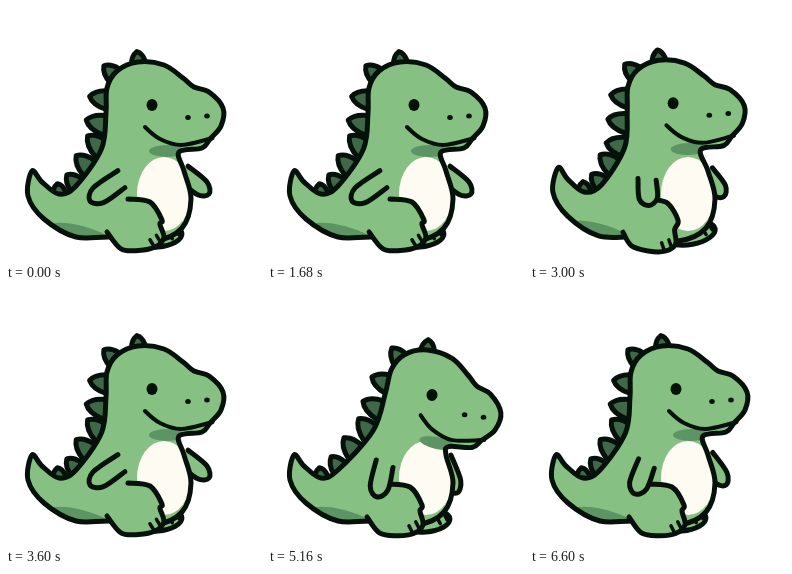
These frames come from a looping animation (256x256 px, 6.72 s). An HTML page with a canvas:

```html
<!DOCTYPE html>
<html lang="en">
<head>
<meta charset="utf-8">
<title>Walking dinosaur</title>
<style>
html, body { margin: 0; height: 100%; overflow: hidden; background: #fff; }
canvas { display: block; width: 100vw; height: 100vh; }
</style>
</head>
<body>
<canvas id="stage"></canvas>
<script>
const STEP = 120, STEPS = 56, CYCLE = 14, JUMP_START = 42, SPIKES = 8;
const INK = '#07110c', GREEN = '#86c183', SHADE = '#5d9464', SPIKE = '#3f6849',
      CREAM = '#fefbf3', RED = '#c65c58';

const canvas = document.getElementById('stage');
const ctx = canvas.getContext('2d');

// Rigid parts, each in its own coordinates: head around the eye, tail around its root.
const SKULL = [[-46, 8], [-45, -17], [-35, -34], [-14, -43], [12, -40], [31, -27],
               [42, -18], [57, -13], [71, 3], [69, 21], [58, 34]];
const JAW = [[50, 43], [27, 47]];
const LIP = [[-7, 22], [8, 34], [29, 40], [57, 34]];
const TAIL_TOP = [[-64, -40], [-54, -29], [-37, -17], [-20, -25]];
const TAIL_UNDER = [[-20, 26], [-52, 8], [-68, -15]];
const TORSO = [[178, 165], [185, 193], [176, 222], [148, 235], [105, 231]];
const THIGH = [[-8, -25], [14, -22], [26, -4]];
const FOOT = [[14, -14], [16, 0], [6, 8], [-11, 9], [-28, 5]];

// hip: shift and tail angle; head, foot, farFoot: place and angle.
const stride = {
  hip: [0, 0, 0], head: [146, 99, 0], jaw: [0],
  hand: [84, 195], farHand: [203, 188],
  knee: [130, 218], foot: [142, 234, -8], farFoot: [151, 230, -5]
};
const sway = {
  hip: [0, 0, 12], head: [135, 92, -2.5], jaw: [0],
  hand: [158, 187], farHand: [188, 178],
  knee: [105, 216], foot: [103, 239, 27], farFoot: [188, 220, -28]
};
const gather = {
  ...stride, hand: [105, 204], farHand: [196, 195], knee: [128, 219], foot: [139, 236, -4]
};
const lean = {
  ...gather, head: [164, 105, 12], hand: [109, 207], farHand: [189, 203], farFoot: [157, 231, -5]
};
const leap = {
  hip: [1, -38, -29], head: [131, 54, -20], jaw: [1],
  hand: [97, 153], farHand: [194, 140],
  knee: [118, 180], foot: [122, 207, 30], farFoot: [161, 192, 0]
};

const lerp = (a, b, t) => a.map((v, i) => v + (b[i] - v) * t);
const mix = (from, to, t) => Object.fromEntries(
  Object.keys(from).map(part => [part, lerp(from[part], to[part], t)]));

const walkKeys = [[0, stride], [2, stride], [7, sway], [13, gather], [14, stride]];
const jumpKeys = [
  [42, stride], [43, lean], [45, mix(gather, lean, 2.6)], [48, leap],
  [50, mix(stride, leap, 1.12)], [53, mix(gather, lean, 1.9)],
  [54, lean], [55, gather], [56, stride]
];

function poseAt(step) {
  const walking = step < JUMP_START;
  const keys = walking ? walkKeys : jumpKeys;
  const at = walking ? step % CYCLE : step;
  const next = keys.findIndex(([time]) => time > at);
  const [t0, from] = keys[next - 1], [t1, to] = keys[next];
  const u = (at - t0) / (t1 - t0);
  return mix(from, to, u * u * (3 - 2 * u));
}

// Moves local points to a place and turns them by an angle in degrees.
function put(points, [x, y, angle = 0]) {
  const c = Math.cos(angle * Math.PI / 180), s = Math.sin(angle * Math.PI / 180);
  return points.map(([px, py]) => [x + px * c - py * s, y + px * s + py * c]);
}

// Smooth curve through all knots.
function curve(knots, closed = true) {
  const n = knots.length, path = new Path2D();
  const knot = i => knots[closed ? (i + n) % n : Math.max(0, Math.min(n - 1, i))];
  const handle = (i, side) => knot(i).map((v, axis) =>
    v + side / 6 * (knot(i + 1)[axis] - knot(i - 1)[axis]));
  path.moveTo(...knots[0]);
  for (let i = 0; i < (closed ? n : n - 1); i++) {
    path.bezierCurveTo(...handle(i, 1), ...handle(i + 1, -1), ...knot(i + 1));
  }
  if (closed) path.closePath();
  return path;
}

function oval([x, y, angle = 0], rx, ry) {
  const path = new Path2D();
  path.ellipse(x, y, rx, ry, angle * Math.PI / 180, 0, Math.PI * 2);
  return path;
}

function fill(path, color) {
  ctx.fillStyle = color;
  ctx.fill(path);
}

function outlined(path, color) {
  fill(path, color);
  ctx.stroke(path);
}

// Spikes stand along the back, closer together towards the tail.
function drawSpikes(back) {
  const lengths = back.slice(1).map(([x, y], i) => Math.hypot(x - back[i][0], y - back[i][1]));
  const total = lengths.reduce((sum, length) => sum + length);
  for (let i = 0; i < SPIKES; i++) {
    const u = i / (SPIKES - 1), bulge = Math.sin(Math.PI * u);
    let rest = total * u * (0.8 + 0.2 * u), k = 0;
    while (k < lengths.length - 1 && rest > lengths[k]) rest -= lengths[k++];
    const [x, y] = lerp(back[k], back[k + 1], rest / lengths[k]);
    const dx = (back[k + 1][0] - back[k][0]) / lengths[k];
    const dy = (back[k + 1][1] - back[k][1]) / lengths[k];
    const at = (along, out) => [x + dx * along + dy * out, y + dy * along - dx * out];
    const half = 7 + 3 * bulge, height = 10 + 9 * bulge;
    const path = new Path2D();
    path.moveTo(...at(-half, 0));
    path.quadraticCurveTo(...at(-half * 0.6, height * 0.8), ...at(3, height));
    path.quadraticCurveTo(...at(half, height * 0.7), ...at(half, 0));
    outlined(path, SPIKE);
  }
}

function arm(shoulder, hand, width) {
  const dx = hand[0] - shoulder[0], dy = hand[1] - shoulder[1];
  const length = Math.hypot(dx, dy);
  const at = (along, side) => [shoulder[0] + dx * along - dy / length * side,
                               shoulder[1] + dy * along + dx / length * side];
  return curve([at(0, width), at(0.75, width), at(1, 0), at(0.75, -width), at(0.1, -width)], false);
}

function drawToes(place, x, y) {
  for (const shift of [0, 7]) {
    const toe = [[x + shift, y - shift / 2], [x + shift + 3, y - shift / 2 + 7]];
    ctx.stroke(curve(put(toe, place), false));
  }
}

function drawDino(p) {
  const [hipX, hipY, tailAngle] = p.hip, [jaw] = p.jaw;
  const fromHip = (x, y) => [x + hipX, y + hipY];
  const tailRoot = [...fromHip(90, 205), tailAngle];
  const tail = put(TAIL_TOP, tailRoot);
  const skull = put(SKULL, p.head);
  const chin = put(JAW.map(([x, y]) => [x - 8 * jaw, y + 10 * jaw]), p.head);
  const [mx, my] = lerp(tail[3], skull[0], 0.55);
  const spine = [mx + 9, my + 3];
  const body = curve([...tail, spine, ...skull, ...chin, ...put(TORSO, p.hip.slice(0, 2)),
                      ...put(TAIL_UNDER, tailRoot)]);

  ctx.lineWidth = 5;
  drawSpikes([tail[2], tail[3], spine, ...skull.slice(0, 4)]);
  outlined(arm(fromHip(174, 164), p.farHand, 8), GREEN);
  outlined(oval(p.farFoot, 25, 11), GREEN);
  ctx.lineWidth = 3.5;
  drawToes(p.farFoot, 12, -3);

  ctx.lineWidth = 5;
  fill(body, GREEN);
  ctx.save();
  ctx.clip(body);
  fill(oval(fromHip(158, 188), 27, 37), CREAM);
  fill(oval([...put([[15, 46 + 8 * jaw]], p.head)[0], p.head[2]], 18, 6), SHADE);
  fill(oval([...put([[-15, 24]], tailRoot)[0], tailAngle + 15], 34, 9), SHADE);
  ctx.restore();
  ctx.stroke(body);

  const leg = [...put(THIGH, p.knee), ...put(FOOT, p.foot), ...put([[-29, 8]], p.knee)];
  outlined(curve(leg, false), GREEN);
  outlined(arm(fromHip(117, 172), p.hand, 9), GREEN);

  const lowerLip = LIP.map(([x, y], i) => [x - 14 * jaw * (i / 3) ** 2, y + 14 * jaw * (i / 3) ** 2]);
  ctx.lineWidth = 4;
  outlined(curve(put([...LIP, ...lowerLip.slice(1).reverse()], p.head)), RED);

  ctx.lineWidth = 3.5;
  drawToes(p.foot, 2, 0);
  fill(oval(p.head, 5.5, 6), INK);
  for (const nostril of put([[36, 12.5], [55, 11]], p.head)) fill(oval(nostril, 2.8, 2.5), INK);
}

function frame(now) {
  const scale = window.devicePixelRatio || 1;
  const w = Math.round(innerWidth * scale), h = Math.round(innerHeight * scale);
  if (canvas.width !== w || canvas.height !== h) {
    canvas.width = w;
    canvas.height = h;
  }
  ctx.setTransform(w / 256, 0, 0, h / 256, 0, 0);
  ctx.clearRect(0, 0, 256, 256);
  ctx.strokeStyle = INK;
  ctx.lineJoin = ctx.lineCap = 'round';
  drawDino(poseAt(Math.floor(now / STEP) % STEPS));
  requestAnimationFrame(frame);
}

requestAnimationFrame(frame);
</script>
</body>
</html>
```
